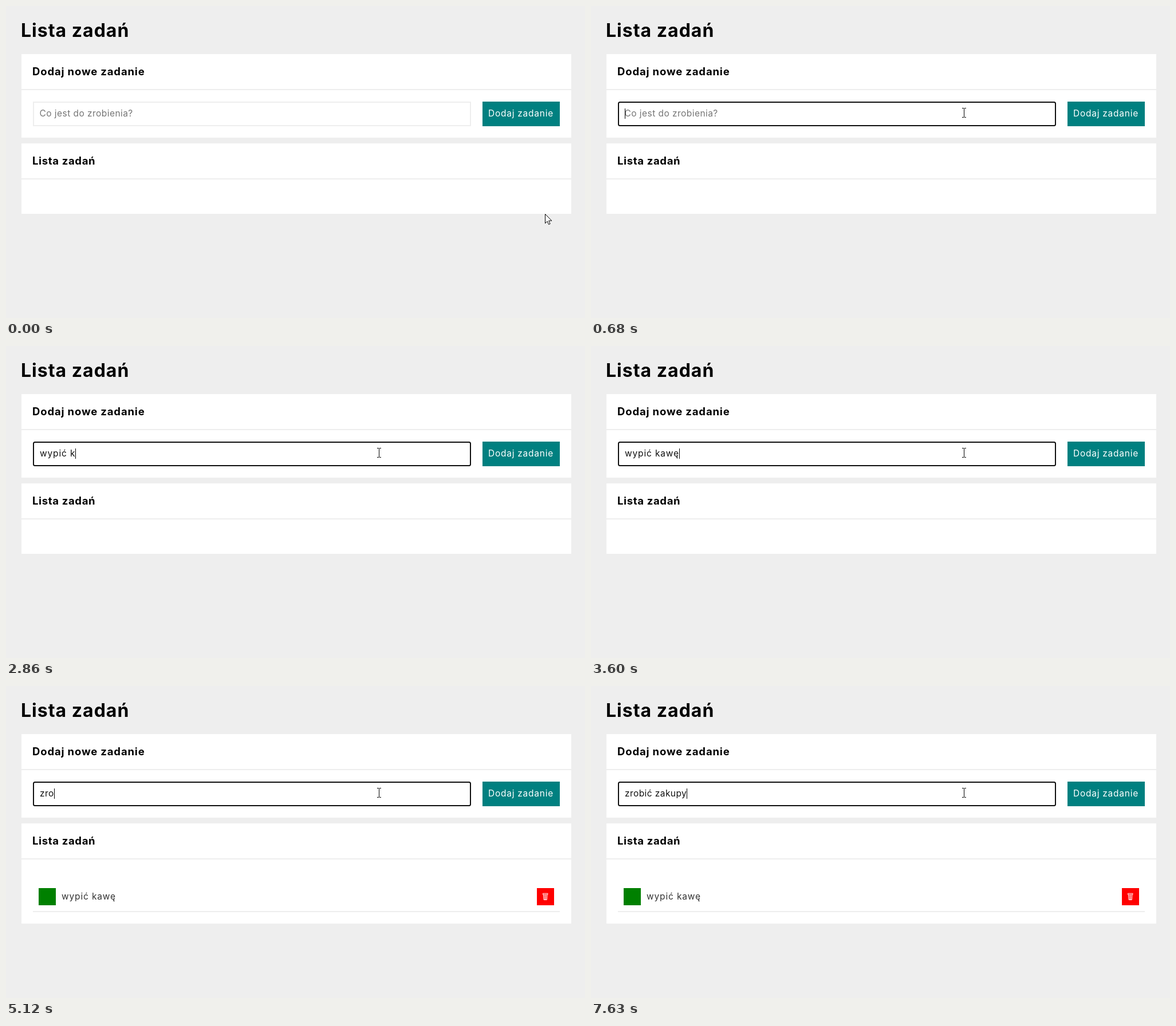
An HTML page for the animation above (8 s loop, 1011 px wide and 545 px high).

```html
<!DOCTYPE html>
<html lang="pl">
<head>
<meta charset="utf-8">
<title>Lista zadań</title>
<style>
  html, body { margin: 0; width: 100%; height: 100%; overflow: hidden; background: #eee; }
  svg { display: block; width: 100%; height: 100%; }
  text { font-family: Inter, "Open Sans", sans-serif; font-size: 15.5px; white-space: pre; }
  .title { font-size: 32px; font-weight: 700; letter-spacing: 1px; }
  .head { font-size: 18.5px; font-weight: 700; }
  .hint { fill: #757575; letter-spacing: .45px; }
</style>
</head>
<body>
<svg viewBox="0 0 1011 545" xmlns="http://www.w3.org/2000/svg">
  <rect width="1011" height="545" fill="#eee"/>
  <text class="title" x="26" y="54">Lista zadań</text>

  <rect x="27" y="84" width="960" height="146" fill="#fff"/>
  <rect x="27" y="145" width="960" height="2" fill="#eee"/>
  <text class="head" x="46" y="121" letter-spacing=".85">Dodaj nowe zadanie</text>
  <rect id="field" x="48" y="168" width="763" height="41" fill="#fff" stroke-width="2"/>
  <text id="hint" class="hint" x="58.5" y="193">Co jest do zrobienia?</text>
  <text id="typed" x="59" y="193" fill="#111"></text>
  <rect id="caret" y="179" width="1" height="18" fill="#000" shape-rendering="crispEdges"/>
  <rect x="832" y="167" width="135" height="43" fill="teal"/>
  <text x="842" y="193" fill="#fff" letter-spacing=".75">Dodaj zadanie</text>

  <rect id="list" x="27" y="240" width="960" fill="#fff"/>
  <rect x="27" y="301" width="960" height="2" fill="#eee"/>
  <text class="head" x="46" y="277" letter-spacing=".65">Lista zadań</text>
  <g id="item">
    <rect x="57" y="353" width="30" height="30" fill="green"/>
    <text x="97" y="373" fill="#333" letter-spacing=".85">wypić kawę</text>
    <rect x="927" y="353" width="30" height="30" fill="red"/>
    <g fill="none" stroke="#fff">
      <path d="M937.5 362.3h8.5v2h-8.5z" stroke-width=".9"/>
      <path d="M938.4 364.5l.7 9h5.2l.7-9M940.6 365l.2 8M942.7 365l-.2 8" stroke-width="1"/>
    </g>
    <rect x="47" y="393" width="920" height="2" fill="#eee"/>
  </g>

  <path id="arrow" d="M.5.5V16.6L4.2 13.1 6.6 18.6 9.1 17.5 6.7 12.1H11.9Z" fill="#fff" stroke="#000"/>
  <path id="beam" d="M-3-7.5H0M1-7.5H4M.5-7V8M-3 8.5H0M1 8.5H4" fill="none" stroke="#000" shape-rendering="crispEdges"/>
</svg>
<script>
const LOOP = 8000, FOCUS = 550, CARET = 680, SUBMIT = 3930, BLINK = [4130, 4660];
const tasks = [
  { text: "wypić kawę", spacing: .85,
    keys: [1080, 1340, 1740, 1870, 2400, 2600, 2860, 2990, 3270, 3600] },
  { text: "zrobić zakupy", spacing: .42,
    keys: [4790, 4990, 5120, 5390, 5590, 5920, 6180, 6510, 6710, 6840, 7170, 7370, 7630] }
];
const move = { start: 130, step: 70, count: 6, from: [941, 363], to: [651, 186] };

const $ = id => document.getElementById(id);
const set = (id, attrs) => {
  for (const name in attrs) $(id).setAttribute(name, attrs[name]);
};
const show = (id, on) => set(id, { visibility: on ? "visible" : "hidden" });

function pointerAt(t) {
  const steps = Math.floor((t - move.start) / move.step) + 1;
  const p = Math.min(1, Math.max(0, steps / move.count));
  const ease = p * p * (3 - 2 * p);
  return move.from.map((a, i) => Math.round(a + (move.to[i] - a) * ease));
}

function drawPointer(t) {
  const [x, y] = pointerAt(t);
  const inField = x > 47 && x < 812 && y > 167 && y < 210;
  const place = { transform: `translate(${x} ${y})` };
  set("arrow", place);
  set("beam", place);
  show("arrow", !inField);
  show("beam", inField);
}

function drawField(t, added) {
  const task = tasks[added ? 1 : 0];
  const text = task.text.slice(0, task.keys.filter(k => k <= t).length);
  const focused = t >= FOCUS;
  const blinkOff = t >= BLINK[0] && t < BLINK[1];
  set("field", { stroke: focused ? "#101010" : "#eee", rx: focused ? 2.5 : 0 });
  $("typed").textContent = text;
  set("typed", { "letter-spacing": task.spacing });
  show("hint", !text);
  const width = text ? $("typed").getComputedTextLength() : 0;
  set("caret", { x: 59 + Math.round(width) });
  show("caret", t >= CARET && !blinkOff);
}

function render(t) {
  const added = t >= SUBMIT;
  set("list", { height: added ? 175 : 123 });
  show("item", added);
  drawField(t, added);
  drawPointer(t);
}

function frame() {
  render(performance.now() % LOOP);
  requestAnimationFrame(frame);
}
frame();
</script>
</body>
</html>
```
